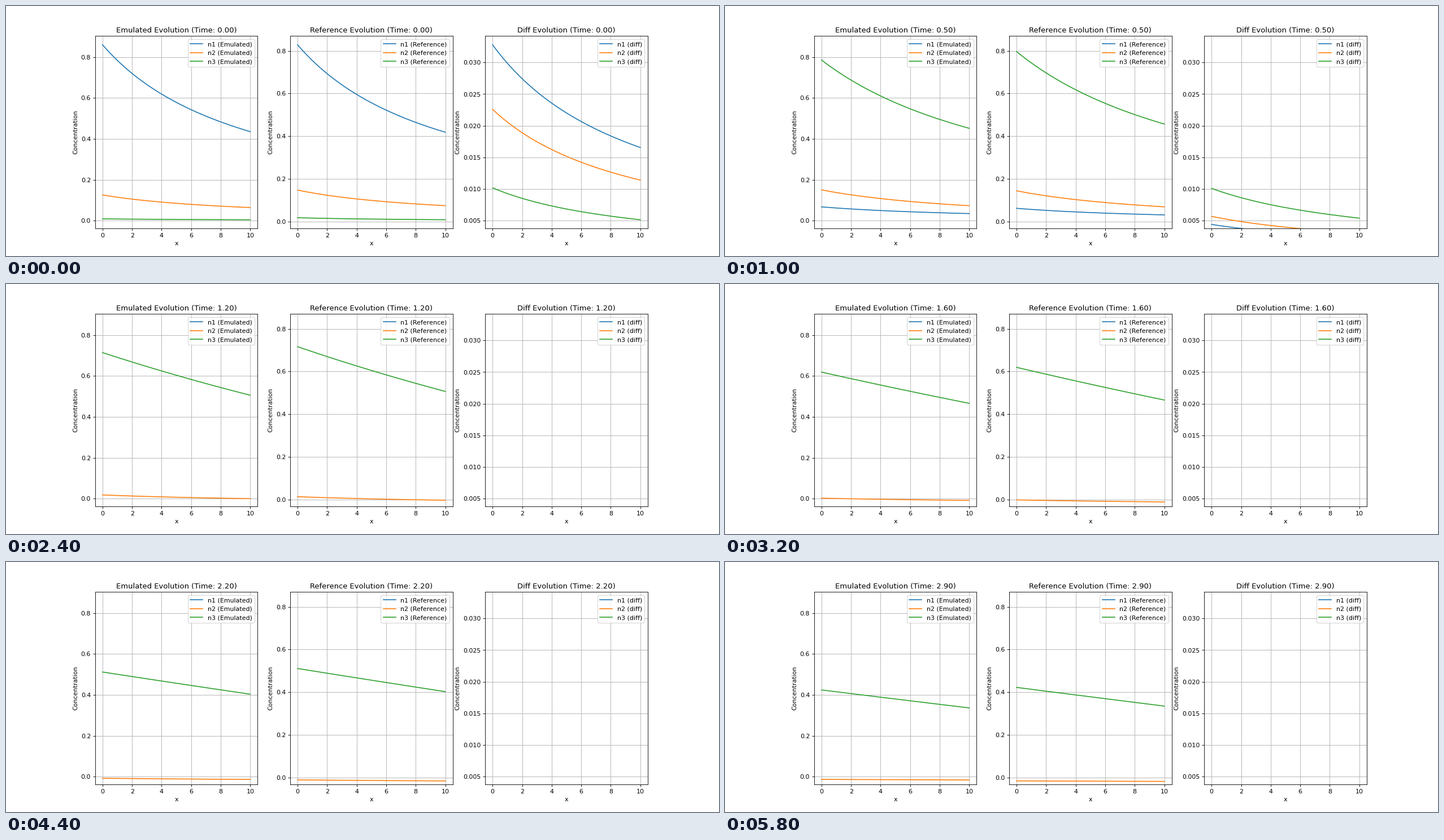
These frames come from a looping animation (1262 by 444 pixels, 6 s). A matplotlib script:

```python
import numpy as np
import matplotlib.pyplot as plt
from matplotlib.animation import FuncAnimation

FRAMES, INTERVAL, STEP = 30, 200, 0.1
DPI = 78.875
N1_END = 0.95    # n1 is no longer plotted after this time
FLOOR = -0.0185  # level the decaying species approach

x = np.linspace(0, 10, 101)
u = x / 10


def profile(ends, bend):
    """Curve over x between its two end values."""
    left, right = ends
    return left + (right - left) * u * (1 + bend) / (1 + bend * u)


def with_far_end(value, ratio):
    return np.array([value, value * ratio])


def model(t):
    """Emulated, reference and difference curves of the three species."""
    burn = np.exp(-2.297 * t - 4.726 * t**2)
    n1 = with_far_end(0.8795 * burn, 0.516 + 0.2 * t)
    n2 = with_far_end(0.11 * np.exp(-1.09 * t)
                      + (0.034 + 2.76 * t) * np.exp(-5.2 * t), 0.57 - 0.06 * t)
    dilution = np.array([0.638 + 0.551 * t, 1.477 + 0.197 * t + 0.09 * t**2])
    n3 = 1 / (dilution + 0.314 * burn) - n1 - n2

    # Errors cancel out, since the total is conserved
    d1 = 0.0353 * np.exp(-2.71 * t - 1.1 * t**2) - 0.0025
    d2 = 0.0089 * np.exp(-0.75 * t) - 0.0315 * np.exp(-8.6 * t)
    errors = [with_far_end(d, 0.505 + 0.06 * t) for d in (d1, d2, -d1 - d2)]

    fast = 0.97 - 0.3 * t
    slow = 0.97 / (1 + (t / 0.65)**3)
    emulated = np.array([profile(n + FLOOR, bend) for n, bend
                         in zip((n1, n2, n3), (fast, fast, slow))])
    diff = np.array([profile(d, fast) for d in errors])
    if t > N1_END:
        emulated[0] = diff[0] = np.nan
    return emulated, emulated - diff, np.abs(diff)


fig, axes = plt.subplots(1, 3, figsize=(16, 5.6292), dpi=DPI)
names = ["Emulated", "Reference", "Diff"]
tags = ["Emulated", "Reference", "diff"]
lines = []
for ax, tag, curves in zip(axes, tags, model(0)):
    lines.append([ax.plot(x, curve, label=f"n{i} ({tag})")[0]
                  for i, curve in enumerate(curves, 1)])
    ax.set(xlabel="x", ylabel="Concentration")
    ax.grid(True)
    ax.legend(loc="upper right")
    # Limits stay as they are at the start
    ax.set_xlim(ax.get_xlim())
    ax.set_ylim(ax.get_ylim())


def update(frame):
    t = frame * STEP
    for ax, name, group, curves in zip(axes, names, lines, model(t)):
        ax.set_title(f"{name} Evolution (Time: {t:.2f})")
        for line, curve in zip(group, curves):
            line.set_ydata(curve)
    return []


anim = FuncAnimation(fig, update, frames=FRAMES, interval=INTERVAL,
                     init_func=lambda: update(0), repeat=True, repeat_delay=0)
plt.show()
```
